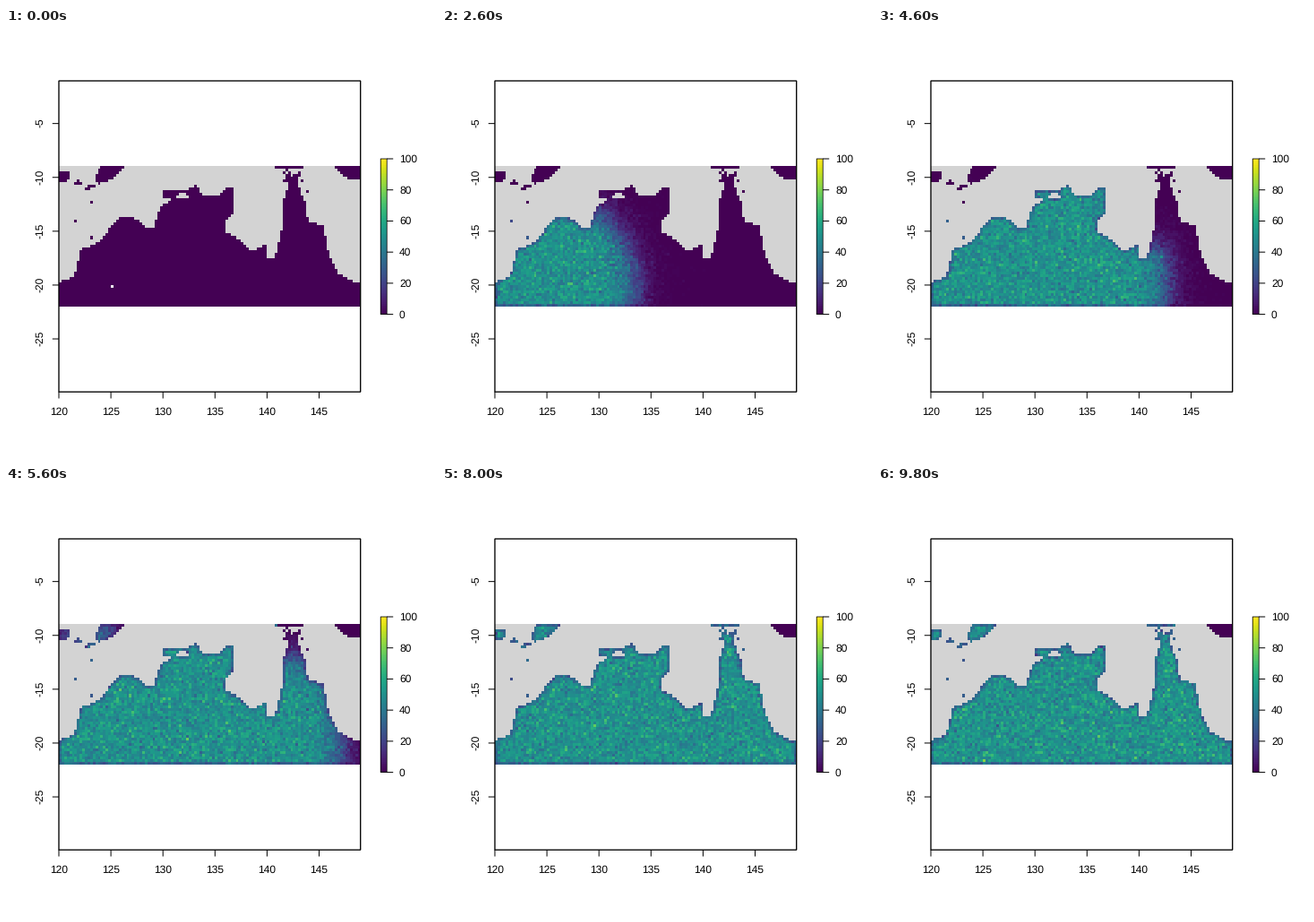
Write a matplotlib script that moves like this. It is 480 px wide and 480 px high and loops after 10 s.

```python
import numpy as np
import matplotlib.pyplot as plt
from matplotlib.animation import FuncAnimation
from matplotlib.patches import Rectangle
from matplotlib.path import Path

FRAMES, STEP = 50, 200
COLS, ROWS, CELL = 116, 52, 0.25
CAPACITY, SPEED, FRONT = 51, 0.92, 0.75
SEED = (44, 20)

plt.rcParams.update({"font.family": "Liberation Sans", "font.size": 9,
                     "text.hinting": "none", "text.hinting_factor": 1})


def px(lon):
    return 59 + 11.62 * (lon - 120)


def py(lat):
    return 232.85 - 12.02 * (lat + 15.5)


lon, lat = np.meshgrid(120 + CELL * (np.arange(COLS) + 0.5),
                       -9 - CELL * (np.arange(ROWS) + 0.5))
X, Y = px(lon), py(lat)


def ellipse(x, y, rx, ry, tilt=0):
    c, s = np.cos(np.radians(tilt)), np.sin(np.radians(tilt))
    u, v = (X - x) * c + (Y - y) * s, (Y - y) * c - (X - x) * s
    return (u / rx) ** 2 + (v / ry) ** 2 < 1


def dist(x, y):
    return np.hypot(lon - x, lat - y)


def make_land():
    # Key corners of the mainland coast, west to east, in stage pixels.
    coast = [(50, 320), (50, 286), (77, 277), (83, 248), (105, 238),
             (126, 212), (143, 212), (156, 223), (165, 223), (173, 201),
             (184, 192), (176, 190), (176, 181), (203, 181), (213, 176),
             (219, 187), (239, 188), (246, 180), (255, 180), (255, 207),
             (244, 217), (244, 230), (256, 233), (274, 248), (290, 242),
             (290, 257), (300, 257), (308, 225), (310, 192), (316, 170),
             (325, 174), (333, 192), (337, 216), (354, 222), (362, 257),
             (371, 275), (405, 290), (405, 320)]
    centres = np.column_stack([X.ravel(), Y.ravel()])
    land = Path(coast).contains_points(centres).reshape(X.shape)
    land &= ~ellipse(197, 188.5, 7.5, 3.5)

    land |= ellipse(117, 159, 22, 9, -38) | ellipse(94, 178, 6, 2.5, -25)
    land |= ellipse(81, 173, 4.5, 2) | ellipse(59, 166, 12.5, 6.5)
    land |= ellipse(396, 150, 29.5, 21)
    for x, y in [(95, 195), (78, 216), (96, 234), (336, 183)]:
        land |= (abs(X - x) < 1.45) & (abs(Y - y) < 1.5)

    # Scattered strait islands below a thin northern shore.
    scatter = np.random.default_rng(4).random(X.shape) < 0.5
    land |= scatter & (abs(X - 321) < 11) & (Y < 172)
    land[0] |= abs(X[0] - 316) < 15.5
    return land


def make_travel():
    # Path length of the invasion, round the gulf and over the sea.
    travel = dist(125.1, -20.1)
    cape = (lon > 140.9) & (lat > -20 + 0.144 * (lon - 125))
    travel[cape] = 16.3 + dist(141.1, -17.7)[cape]
    offshore = (lon < 127) & (lat > -13)
    travel[offshore] = 19.8 + dist(122.9, -11.1)[offshore]
    travel[(lon > 146) & (lat > -11)] = 1000
    return travel


land, travel = make_land(), make_travel()

# Shores lose the offspring that land in the sea.
pad = np.pad(land.astype(float), 1)
share = sum(pad[i:i + ROWS, j:j + COLS] for i in range(3) for j in range(3)) / 9
limit = CAPACITY * np.maximum(share, 0.62)


def population(n):
    count = np.zeros(X.shape)
    if n < 3:
        count[SEED] = 2 if n else 1000
    else:
        rng = np.random.default_rng(n)
        reach = 4.55 + SPEED * (n - 9)
        slope = np.clip((travel - reach) / FRONT, -50, 50)
        count = rng.poisson(limit / (1 + np.exp(slope)))
    return np.ma.masked_where(~land, count)


fig = plt.figure(figsize=(5, 5), dpi=96, facecolor="white")
ax = fig.add_axes([0, 0, 1, 1])
ax.set_axis_off()


def line(x, y):
    ax.plot(x, y, color="black", lw=0.75, solid_capstyle="butt", snap=False)


def box(x, y, w, h, lw):
    ax.add_patch(Rectangle((x, y), w, h, fill=False, ec="black", lw=lw,
                           snap=False))


def label(x, y, value, **kw):
    ax.text(x, y, str(value), va="center", **kw)


def raster(data, extent):
    return ax.imshow(data, cmap=cmap, vmin=0, vmax=100, aspect="auto",
                     interpolation="nearest", extent=extent)


cmap = plt.get_cmap("viridis").with_extremes(bad="lightgrey", over="white")
grid = raster(population(0), (px(120), px(149), py(-22), py(-9)))
raster(np.linspace(100, 0, 100)[:, None], (418, 425, 320, 146))
box(59, 59, 336.7, 347.2, 1)
box(418.2, 146, 7, 173.6, 0.6)

for v in range(120, 150, 5):
    line([px(v)] * 2, [406, 413.5])
    label(px(v), 429, v, ha="center")
for v in range(-25, 0, 5):
    line([51.8, 59], [py(v)] * 2)
    label(38, py(v) - 0.6, v, ha="center", rotation=90)
for v in range(0, 101, 20):
    y = 319.6 - 1.736 * v
    line([425, 432.2], [y, y])
    label(439, y + 0.8, v, ha="left")

ax.set_xlim(0, 480)
ax.set_ylim(480, 0)


def update(n):
    grid.set_data(population(n))
    return [grid]


anim = FuncAnimation(fig, update, frames=FRAMES, interval=STEP, repeat=True,
                     repeat_delay=0)
plt.show()
```
